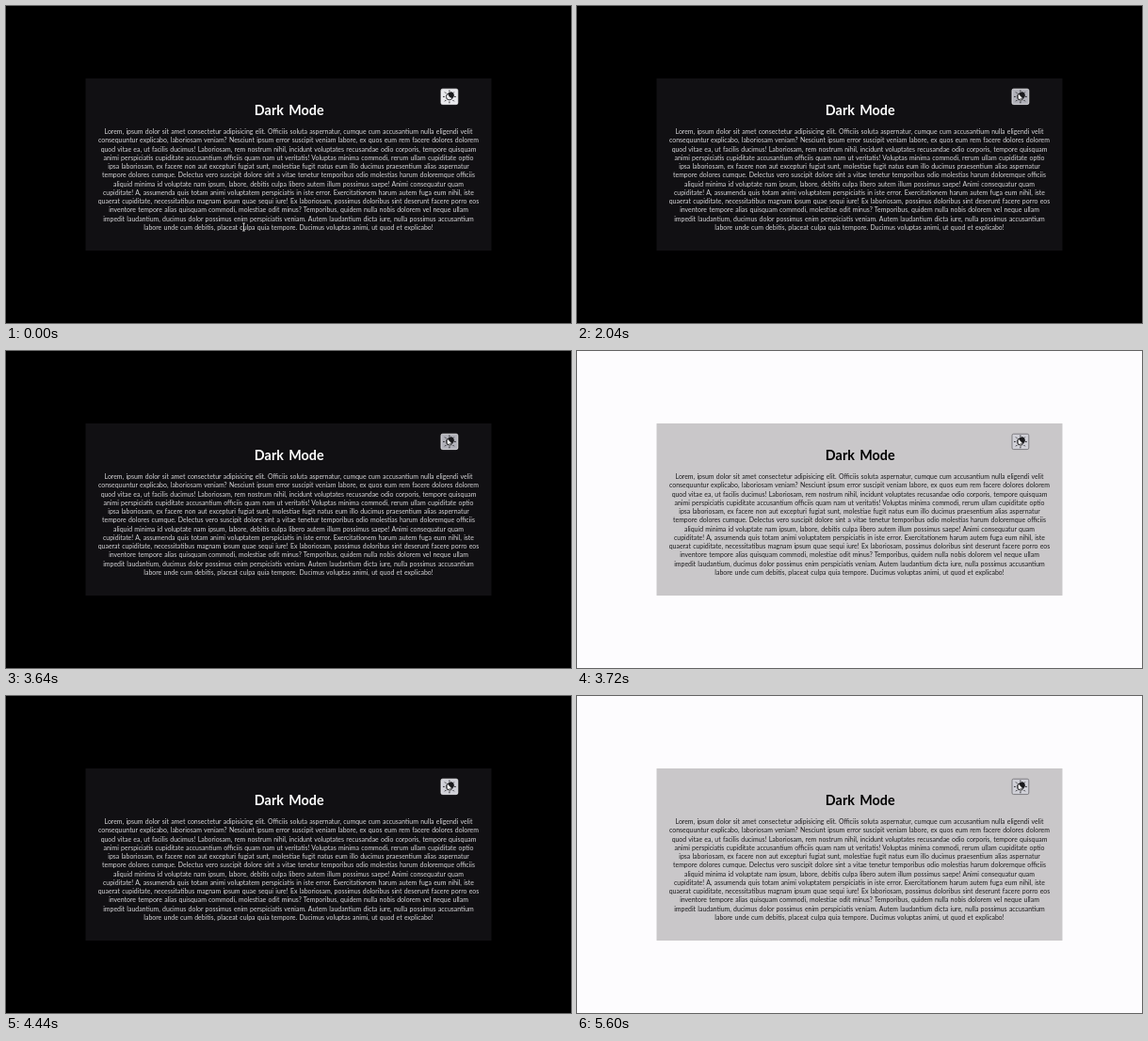
Animation, 600 px wide and 337 px high, one loop 7 s. Source, as an HTML page:

```html
<!DOCTYPE html>
<html lang="en">
<head>
<meta charset="utf-8">
<title>Dark Mode</title>
<style>
  html, body { margin: 0; width: 100%; height: 100%; overflow: hidden; }
  svg {
    display: block; width: 100vw; height: 100vh;
    font-family: Lato, "Open Sans", sans-serif;
    text-anchor: middle;
    --page: #000; --card: #111013; --ink: #d6d5d8; --title: #fff; --edge: #f4f4f6;
  }
  svg.light { --page: #fdfcfe; --card: #c9c7c9; --ink: #1c1b1d; --title: #000; --edge: #69686c; }
  #page { fill: var(--page); }
  #card { fill: var(--card); }
  #heading { fill: var(--title); font-size: 14.3px; font-weight: 700; letter-spacing: .1px; word-spacing: 1.5px; }
  #copy { fill: var(--ink); font-size: 6.93px; word-spacing: .5px; }
  #button { stroke: var(--edge); stroke-width: .8; }
  #icon { fill: none; stroke: #19191c; stroke-width: .9; stroke-linecap: round; }
  #icon .half { fill: #19191c; stroke: none; }
  #beam { fill: none; stroke: #f2f2f2; stroke-width: .75; }
  #arrow { fill: #fff; stroke: #111; stroke-width: .5; stroke-linejoin: round; }
</style>
</head>
<body>
<svg id="stage" viewBox="0 0 600 337" preserveAspectRatio="none">
  <rect id="page" width="600" height="337"/>
  <rect id="card" x="84.5" y="77" width="431" height="183"/>
  <text id="heading" x="300.8" y="115.7">Dark Mode</text>
  <g id="copy"></g>
  <rect id="button" x="462" y="88.2" width="17.8" height="16.4" rx="1.6"/>
  <g id="icon" transform="translate(470.9 96.4)">
    <circle r="3.5"/>
    <path class="half" d="M-1.6-3.1A3.5 3.5 0 1 1 3.1 1.6Q-.8 1-1.6-3.1Z"/>
    <g id="rays"></g>
  </g>
  <path id="beam" d="M-1.4-4H1.4M0-4V4M-1.4 4H1.4"/>
  <path id="arrow" d="M0 0V7L1.6 5.6 2.7 8 3.8 7.5 2.8 5.2H5Z"/>
</svg>
<script>
const LOOP = 7000;
const NS = "http://www.w3.org/2000/svg";
const $ = id => document.getElementById(id);

const lines = [
  "Lorem, ipsum dolor sit amet consectetur adipisicing elit. Officiis soluta aspernatur, cumque cum accusantium nulla eligendi velit",
  "consequuntur explicabo, laboriosam veniam? Nesciunt ipsum error suscipit veniam labore, ex quos eum rem facere dolores dolorem",
  "quod vitae ea, ut facilis ducimus! Laboriosam, rem nostrum nihil, incidunt voluptates recusandae odio corporis, tempore quisquam",
  "animi perspiciatis cupiditate accusantium officiis quam nam ut veritatis! Voluptas minima commodi, rerum ullam cupiditate optio",
  "ipsa laboriosam, ex facere non aut excepturi fugiat sunt, molestiae fugit natus eum illo ducimus praesentium alias aspernatur",
  "tempore dolores cumque. Delectus vero suscipit dolore sint a vitae tenetur temporibus odio molestias harum doloremque officiis",
  "aliquid minima id voluptate nam ipsum, labore, debitis culpa libero autem illum possimus saepe! Animi consequatur quam",
  "cupiditate! A, assumenda quis totam animi voluptatem perspiciatis in iste error. Exercitationem harum autem fuga eum nihil, iste",
  "quaerat cupiditate, necessitatibus magnam ipsum quae sequi iure! Ex laboriosam, possimus doloribus sint deserunt facere porro eos",
  "inventore tempore alias quisquam commodi, molestiae odit minus? Temporibus, quidem nulla nobis dolorem vel neque ullam",
  "impedit laudantium, ducimus dolor possimus enim perspiciatis veniam. Autem laudantium dicta iure, nulla possimus accusantium",
  "labore unde cum debitis, placeat culpa quia tempore. Ducimus voluptas animi, ut quod et explicabo!"
];

// Each click: button goes down, then the theme flips on release.
const clicks = [[2040, 2120], [2880, 2920], [3640, 3720], [4320, 4400], [5360, 5520]];

// Pointer moves: start, end, from, to
const moves = [
  [40, 400, [252.5, 235], [363, 178]],
  [520, 1240, [363, 178], [457, 107]],
  [1240, 1720, [457, 107], [468.5, 93]]
];

function add(parent, tag, attrs, text = "") {
  const node = document.createElementNS(NS, tag);
  for (const key in attrs) node.setAttribute(key, attrs[key]);
  node.textContent = text;
  parent.append(node);
}

lines.forEach((line, i) => add($("copy"), "text", { x: 300, y: 136.1 + i * 9.25 }, line));
for (let i = 0; i < 8; i++) {
  add($("rays"), "path", { d: "M0-5.5V-6.5", transform: `rotate(${i * 45})` });
}

const ease = p => p * p * (3 - 2 * p);

function pointerAt(t) {
  let spot = moves[0][2];
  for (const [start, end, from, to] of moves) {
    if (t < start) break;
    const p = ease(Math.min(1, (t - start) / (end - start)));
    spot = from.map((v, i) => v + (to[i] - v) * p);
  }
  return spot;
}

function render(t) {
  const [x, y] = pointerAt(t);
  const flips = clicks.filter(([, up]) => t >= up).length;
  const pressed = clicks.some(([down, up]) => t >= down && t < up);
  const hover = x >= 462 && y <= 105;
  const overText = y > 130;

  $("stage").classList.toggle("light", flips % 2 === 1);
  $("button").setAttribute("fill", pressed ? "#b1b1b9" : hover ? "#d0d0d7" : "#e9e9ed");
  for (const [id, shown] of [["beam", overText], ["arrow", !overText]]) {
    $(id).setAttribute("transform", `translate(${x} ${y})`);
    $(id).setAttribute("visibility", shown ? "visible" : "hidden");
  }
}

const begin = performance.now();
function tick() {
  render((performance.now() - begin) % LOOP);
  requestAnimationFrame(tick);
}
render(0);
requestAnimationFrame(tick);
</script>
</body>
</html>
```
